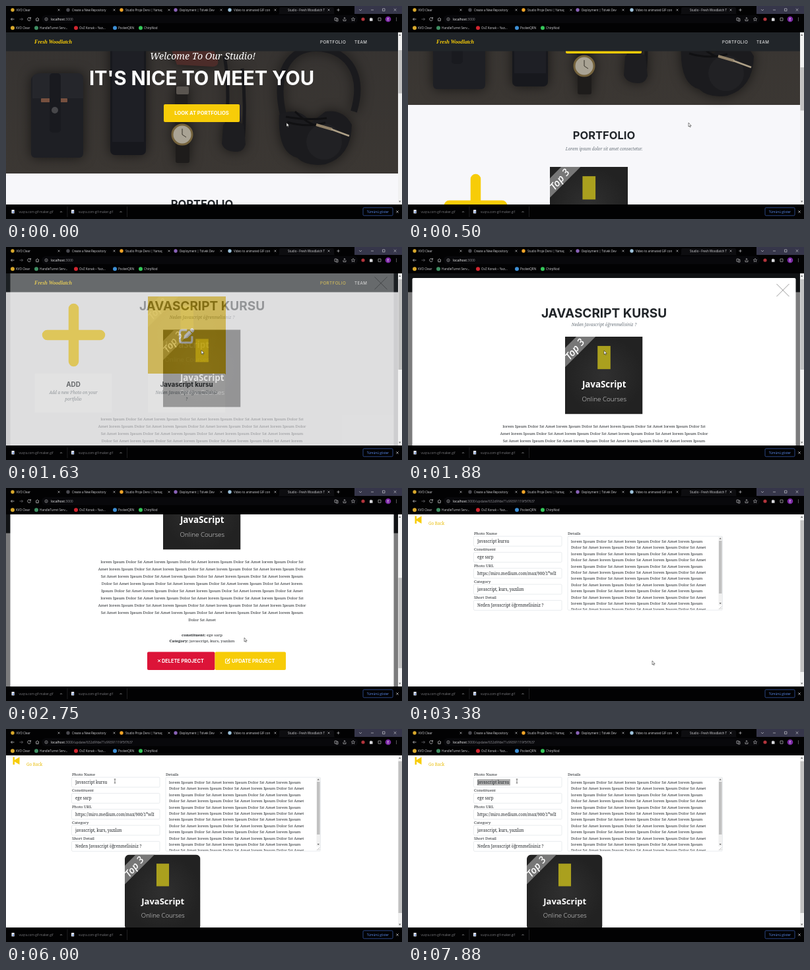
An HTML page for the animation above (8 s loop, 600 by 323 pixels).

```html
<!DOCTYPE html>
<html lang="tr">
<head>
<meta charset="utf-8">
<title>Studio</title>
<style>
html, body { margin: 0; width: 100%; height: 100%; overflow: hidden; background: #000; }
body > svg { display: block; width: 100%; height: 100%; }
text { white-space: pre; }
.m { font-family: Inter, sans-serif; font-weight: 700; }
.n { font-family: Inter, sans-serif; letter-spacing: .0625em; }
.s { font-family: "Noto Serif", serif; }
.i { font-style: italic; }
.u { font-family: "Open Sans", sans-serif; }
.c { text-anchor: middle; }
</style>
</head>
<body>
<svg id="stage" viewBox="0 0 600 323"></svg>
<script>
const YELLOW = '#f7cc08', INK = '#212529', GREY = '#6c757d', LIGHT = '#d8d8dc';

const rect = (x, y, w, h, fill, rx = 0, more = '') =>
  `<rect x="${x}" y="${y}" width="${w}" height="${h}" fill="${fill}" rx="${rx}" ${more}/>`;
const disc = (x, y, r, fill, more = '') =>
  `<circle cx="${x}" cy="${y}" r="${r}" fill="${fill}" ${more}/>`;
const shape = (d, fill, more = '') => `<path d="${d}" fill="${fill}" ${more}/>`;
const line = (d, color, w = .7, more = '') =>
  `<path d="${d}" fill="none" stroke="${color}" stroke-width="${w}" ${more}/>`;
const text = (x, y, size, cls, fill, str, more = '') =>
  `<text x="${x}" y="${y}" font-size="${size}" class="${cls}" fill="${fill}" ${more}>${str}</text>`;
const group = (id, body, more = '') => `<g id="${id}" ${more}>${body}</g>`;
const cross = (x, y, r, color, w) =>
  line(`M${x - r} ${y - r}l${2 * r} ${2 * r}m0 ${-2 * r}l${-2 * r} ${2 * r}`, color, w);

const words = 'lorem Ipsum Dolor Sıt Amet'.split(' ');
function paragraph(counts, x, y, pitch, cls) {
  let n = 0;
  return counts.map((count, i) => text(x, y + i * pitch, 6, cls, INK,
    Array.from({ length: count }, () => words[n++ % 5]).join(' '))).join('');
}

const editIcon = (x, y, k) => `<g transform="translate(${x} ${y}) scale(${k})">` +
  line('M12 4H4.500Q1.500 4 1.500 7V19.500Q1.500 22.500 4.500 22.500H16.500Q19.500 22.500 19.500 19.500V13', '#fff', 3) +
  shape('M7 17l1.200-5.500L15 4.700l4.300 4.300L12.500 15.800zM16 3.700l2-2q1.500-1.200 3 0l1.300 1.300q1.200 1.500 0 3l-2 2z', '#fff') + '</g>';

const course = (x, y, size, rx = 0) =>
  `<svg x="${x}" y="${y}" width="${size}" height="${size}" viewBox="0 0 117 117">` +
  rect(0, 0, 117, 117, 'url(#slate)', rx) +
  shape('M17 0H46L0 46V17z', '#777') +
  text(0, 0, 15, 'u i', '#fff', 'Top 3', 'font-weight="600" transform="translate(7 36) rotate(-50)"') +
  rect(49, 14, 19.500, 35, '#aaa01e') +
  text(59, 77, 13.300, 'u c', '#fff', 'JavaScript', 'font-weight="700"') +
  text(59, 98, 9.800, 'u c', '#e4e4e4', 'Online Courses', 'font-weight="300"') + '</svg>';

const desk = rect(38, 106, 79, 124, '#1e1f24', 6) +
  shape('M40 108q2-5 10-6h60q7 1 7 8v30H40z', '#25262b') +
  rect(53, 140, 40, 6, '#77503f', 1) +
  rect(66, 102, 17, 90, '#191a1f', 5) + disc(74, 158, 5, '#47474a') +
  rect(158, 50, 54, 176, '#17181d', 7) + rect(161, 60, 48, 146, '#1e1f25') +
  shape('M248 60h64l9 22q2 9-8 10l-54-3z', '#4c2c29') +
  rect(256, 122, 19, 58, '#211f1e', 3) + rect(258, 122, 19, 12, '#5a5550', 2) +
  rect(257, 205, 21, 33, '#1e1c1b', 3) +
  disc(267, 195, 15, '#a9a394', 'stroke="#75633d" stroke-width="3"') +
  line('M267 186v9l6 4', '#39342b', 1) +
  line('M331 76q10 60 0 130M358 95q6 60 1 112', '#18181b', 5) +
  shape('M329 180q14-12 31 0l3 30q-4 12-14 11-18 0-22-12z', '#1d1d20') +
  line('M420 165C405 100 430 64 470 64S546 96 527 160', '#1a1a1d', 10) +
  shape('M414 165q30-14 48 12l22-17q27-4 40 20-1 48-40 60-29 4-43-10-30-8-27-65z', '#1b1b1e') +
  disc(482, 206, 27, '#212124') +
  line('M424 168q34 6 62 2M426 176q30 9 58 1M438 160q20 20 36 22', '#101012', 3) +
  line('M470 180l24 7', '#93836a', 4) + line('M493 187l27 10', '#aea087', 2.500);

const hero = rect(0, 40, 594, 214, 'url(#wood)') +
  group('desk', desk, 'style="filter:drop-shadow(0 0 9px #0009)"') +
  text(298, 81, 14.200, 's i c', '#fff', 'Welcome To Our Studio!') +
  text(296.500, 119.500, 29.200, 'm c', '#fff', "IT'S NICE TO MEET YOU") +
  rect(239, 149, 115, 27, YELLOW, 2) +
  text(296.500, 165, 7.500, 'm c', '#fff', 'LOOK AT PORTFOLIOS');

const caption = (x, title, first, second) => rect(x - 58.500, 465, 117, 59, '#fff') +
  text(x, 485, 9.800, 'm c', INK, title) +
  text(x, 496, 6.250, 's i c', GREY, first) + text(x, 505.500, 6.250, 's i c', GREY, second);

const home = rect(0, 40, 594, 900, '#f7f7fa') + hero +
  text(297, 306.300, 16.500, 'm c', INK, 'PORTFOLIO') +
  text(297, 322.500, 6.250, 's i c', GREY, 'Lorem ipsum dolor sit amet consectetur.') +
  line('M102.500 366.500v80M62.500 406.500h80', YELLOW, 15.500, 'stroke-linecap="round"') +
  course(215, 348, 118) +
  group('hover', rect(215, 348, 118, 118, '#f2c408', 0, 'opacity=".88"') + editIcon(262, 395, 1.020)) +
  caption(102, 'ADD', 'Add a new Photo on your', 'portfolio') +
  caption(273.500, 'Javascript kursu', 'Neden Javascript öğrenmelisiniz', '?');

const nav = rect(0, 40, 594, 28.500, INK) +
  text(43, 57, 8.100, 's i', YELLOW, 'Fresh Woodlatch', 'style="font-family:\'Liberation Serif\',serif" font-weight="700"') +
  text(476, 56.500, 6.300, 'n', '#fff', 'PORTFOLIO', 'id="link"') +
  text(528, 56.500, 6.200, 'n', '#fff', 'TEAM');

const pair = (y, key, value) =>
  text(297, y, 6, 's c', INK, `<tspan font-weight="700">${key}:</tspan> ${value}`);

const modal = rect(6.500, 47, 581, 460, '#fff', 2) + cross(568, 65.500, 9.500, '#555', .6) +
  text(297, 107, 19, 'm c', INK, 'JAVASCRIPT KURSU') +
  text(297, 120, 6.250, 's i c', GREY, 'Neden Javascript öğrenmelisiniz ?') +
  course(238, 136, 117.500) +
  paragraph([...Array(8).fill(19), 3], 297, 274, 11, 's c') +
  pair(384.500, 'constituent', 'ege sarp') + pair(394, 'Category', 'javascript, kurs, yazılım') +
  rect(214, 408.500, 102.500, 27.500, '#dc1438', 2) + cross(232, 422, 2, '#fff', 1) +
  text(236, 424.700, 7.350, 'm', '#fff', 'DELETE PROJECT') +
  rect(316.500, 408.500, 107.500, 27.500, YELLOW, 2) + editIcon(332, 418, .34) +
  text(342, 424.700, 7.350, 'm', '#fff', 'UPDATE PROJECT');

const box = (x, y, w, h) => rect(x, y, w, h, '#fff', 1.500, 'stroke="#d3d8dd" stroke-width=".5"');
const fields = [
  ['Photo Name', 'Javascript kursu'], ['Constituent', 'ege sarp'],
  ['Photo URL', 'https://miro.medium.com/max/900/1*wlI'],
  ['Category', 'javascript, kurs, yazılım'], ['Short Detail', 'Neden Javascript öğrenmelisiniz ?']
].map(([label, value], i) => {
  const y = 73.200 + i * 24.300;
  return text(100, y - 2.200, 6, 's', INK, label) + box(99.500, y, 133.500, 15) +
    (i ? '' : rect(105, 76, 50, 9.500, '#b3b3b3', 0, 'id="selection"')) +
    `<svg x="105" y="${y}" width="123" height="15">${text(0, 9.800, 6.200, 's', INK, value)}</svg>`;
}).join('');

const form = rect(0, 40, 594, 262, '#fff') +
  shape('M10.500 42.500h2.500v4.600l7.500-4.600v11.500l-7.500-4.600v4.600h-2.500z', YELLOW) +
  text(31, 55.500, 6.300, 's', '#e9bd08', 'Go Back') + fields +
  line('M155 76.500v8.500', '#000', .6, 'id="caret"') +
  text(242, 71, 6, 's', INK, 'Details') + box(242, 73.200, 234.500, 112) +
  '<svg x="242" y="73.500" width="234" height="111.200" viewBox="242 73.500 234 111.200">' +
  paragraph([12, 13, 12, 13, 12, 13, 12, 13, 12, 13, 12, 13], 247, 83, 9.400, 's') +
  rect(470.500, 74, 5.500, 104, '#f1f1f1') + rect(471, 80, 4.500, 80, '#c1c1c1') +
  shape('M471.500 77.500l1.700-2 1.700 2zM471.500 174l1.700 2 1.700-2z', '#666') +
  line('M471 184l4.500-4.500M473.500 184l2-2', '#888', .5) + '</svg>' +
  group('photo', course(180, 190.500, 114.500, 7));

const scrollbar = rect(594, 40, 6, 261, '#f1f1f1') + rect(594.500, 49, 5.500, 65, '#c1c1c1', 0, 'id="thumb"') +
  shape('M595 45l1.700-2.200 1.700 2.200zM595 295.500l1.700 2.200 1.700-2.200z', '#666');

const tabs = [
  [10, '#d9a92c', 'KVO Clear', 80], [94, '#4a4a50', 'Create a New Repository', 164],
  [175, '#f0a428', 'Studio Proje Dersi | Yamaç', 247], [257, '#8a63b8', 'Deployment | Tolvek Dev', 326],
  [339, '#9ec3dc', 'Video to animated GIF con', 408], [0, '', 'Studio - Fresh Woodlatch T', 489]
].map(([x, color, title, close]) => (color ? disc(x, 6, 2.700, color) : '') +
  text(color ? x + 6 : 427, 7.800, 4.500, 'u', LIGHT, title) + cross(close, 6, 1.400, LIGHT, .6)).join('');

const bookmarks = [
  [10, '#d9a92c', 'KVO Clear'], [46, '#3f8f63', 'HandleTurret Serv...'],
  [106, '#d3252f', 'OvZ Konak – Yazı...'], [165, '#3d8fd6', 'PocketQRN'], [204, '#35c759', 'ChirpNod']
].map(([x, color, title]) => disc(x, 33.200, 3, color) + text(x + 5, 35, 4.600, 'u', LIGHT, title)).join('');

const download = x => rect(x - 2, 309, 4.200, 5.500, '#e6e9f2', .5) + disc(x + .5, 312.500, 1, '#3c71d8') +
  text(x + 9, 314, 4.700, 'u', '#77777c', 'vuqra.com-gif-maker.gif') +
  line(`M${x + 71.500} 313l1.500-1.500 1.500 1.500`, LIGHT, .6) + line(`M${x + 82.500} 304v16`, '#3a3a3e', .5);

const browser = rect(0, 0, 600, 40, '#020203') +
  shape('M412 12.500q2 0 2-3V4q0-2 2-2h79q2 0 2 2v5.500q0 3 2 3z', '#0d0d10') + tabs +
  rect(528, 0, 72, 12, '#36364a') +
  line('M503.500 3.800v4.400m-2.200-2.200h4.400M535 5l2 2 2-2M553 6h4M570.500 4h3.500v3.500h-3.500z', LIGHT, .6) +
  cross(589.500, 5.800, 1.800, LIGHT, .6) +
  rect(54, 14, 479, 12, '#08080b', 6) +
  line('M12.500 20h-5m2-2l-2 2 2 2', LIGHT) + line('M20.500 20h5m-2-2l2 2-2 2', '#77777b') +
  line('M37 18.500a2.400 2.400 0 1 0 .4 2M37.500 17v2h-2M45 20l2.500-2.200 2.500 2.200m-4.300-.5v3h3.500v-3', LIGHT) +
  disc(61, 20, 2.200, 'none', `stroke="${LIGHT}" stroke-width=".5"`) + line('M61 19.600v1.700M61 18.500v.5', LIGHT, .6) +
  text(68, 21.900, 5, 'u', '#fff', 'localhost<tspan id="path" fill="#8f8f95"></tspan>') +
  line('M498 18h3v4h-3zM501 19h2v4h-3M511 20v2.500h4v-2.500M513 21v-3.500m-1.300 1.200l1.300-1.300 1.300 1.300', LIGHT, .6) +
  line('M526 17.300l.8 1.900 2 .1-1.500 1.300.5 2-1.800-1.100-1.800 1.100.5-2-1.500-1.300 2-.1z', LIGHT, .5) +
  disc(541, 20, 2.600, '#b3343c') + shape('M551 18.500h1.200q.8-2 1.600 0h1.700v4.200H551z', LIGHT) +
  line('M564 18h4v4.200h-4z', LIGHT, .6) +
  disc(579, 20, 4.300, '#7d2aa6') + text(579, 21.800, 5, 'u c', '#fff', 'E') +
  [18, 20, 22].map(y => disc(591.500, y, .5, LIGHT)).join('') + bookmarks +
  rect(0, 301, 600, 22, '#020203') + download(10.500) + download(101) +
  rect(541, 305.800, 45, 12, 'none', 1.500, 'stroke="#3b62b8" stroke-width=".7"') +
  text(563.500, 313.600, 4.700, 'u c', '#5a8df5', 'Tümünü göster') + cross(593, 312, 1.700, LIGHT, .7);

const outline = 'stroke="#111" stroke-width=".5" stroke-linejoin="round"';
const pointers = group('arrow', shape('M0 0v6l1.400-1.200.9 2 .9-.4-.9-1.900h1.900z', '#fff', outline)) +
  group('hand', shape('M-.7.500q.7-1 1.400 0v2.500l2.600.6q.8.300.7 1.200l-.6 2.700h-3.600l-2-2.800q.2-1 1.500-.1z', '#fff', outline)) +
  group('beam', line('M-1.300-3h2.600M0-3v6M-1.300 3h2.600', '#222', .6));

stage.innerHTML =
  `<defs><linearGradient id="wood" x2="0" y2="1"><stop stop-color="#363331"/><stop offset="1" stop-color="#3b3733"/></linearGradient>
  <radialGradient id="slate"><stop stop-color="#303030"/><stop offset="1" stop-color="#222"/></radialGradient></defs>` +
  group('homePage', home) + group('navBar', nav) + rect(0, 40, 594, 262, '#000', 0, 'id="dim"') +
  group('dialog', modal) + group('formPage', form) + scrollbar + browser + group('pointer', pointers);

const el = id => document.getElementById(id);
const set = (id, name, value) => el(id).setAttribute(name, value);
const show = (id, on) => set(id, 'visibility', on ? 'visible' : 'hidden');

// Linear interpolation over rows of [time, ...values]
function at(keys, t) {
  const i = keys.findIndex(k => k[0] > t);
  if (i < 0) return keys[keys.length - 1].slice(1);
  if (i === 0) return keys[0].slice(1);
  const [a, b] = [keys[i - 1], keys[i]], f = (t - a[0]) / (b[0] - a[0]);
  return a.slice(1).map((v, j) => v + (b[j + 1] - v) * f);
}

const mouse = [[0, 425, 177], [1000, 425, 177], [1375, 295, 156], [1875, 297, 157], [2250, 297, 157],
  [2750, 361, 227], [3125, 370, 262], [3625, 370, 262], [4250, 156, 113], [4500, 170, 86],
  [4625, 170, 88], [5000, 170, 87], [5375, 165, 79]];
const pageScroll = [[125, 0], [500, 104], [1000, 273]];
const modalScroll = [[1875, 0], [2500, 160]];
const hoverFade = [[1125, 0], [1375, 1]];
const modalFade = [[1500, 0], [1875, 1]];

function draw(now) {
  const t = Math.floor(now % 8000 / 125) * 125;
  const [scroll] = at(pageScroll, t), [inner] = at(modalScroll, t), [open] = at(modalFade, t);
  const [x, y] = at(mouse, t), updating = t >= 3250;

  set('homePage', 'transform', `translate(0 ${-scroll})`);
  set('hover', 'opacity', at(hoverFade, t)[0]);
  set('link', 'fill', scroll > 200 ? YELLOW : '#fff');
  set('dim', 'opacity', open * .5);
  set('dialog', 'opacity', open);
  set('dialog', 'transform', `translate(0 ${-inner - 16 * (1 - open)})`);

  show('formPage', updating);
  show('photo', t >= 3500);
  show('caret', t >= 5500 && t < 7625 && Math.floor((t - 5500) / 500) % 2 === 0);
  show('selection', t >= 7625);
  set('selection', 'x', t < 7750 ? 138 : 105);
  set('selection', 'width', t < 7750 ? 17 : 50);
  el('path').textContent = ':3000' + (updating ? '/update/632d9fde71c99391119f5f763?' : '');

  const [top, length] = updating ? [49, 230] : open > 0 ? [49 + inner * .545, 137] : [67 + scroll * .25, 65.500];
  set('thumb', 'y', top);
  set('thumb', 'height', length);

  const hand = t >= 1250 && t < 1625 || t >= 3000 && t < 3375;
  const beam = t >= 4500;
  show('hand', hand);
  show('beam', beam);
  show('arrow', !hand && !beam);
  set('pointer', 'transform', `translate(${x} ${y})`);
}

function loop() {
  draw(performance.now());
  requestAnimationFrame(loop);
}
loop();
</script>
</body>
</html>
```
